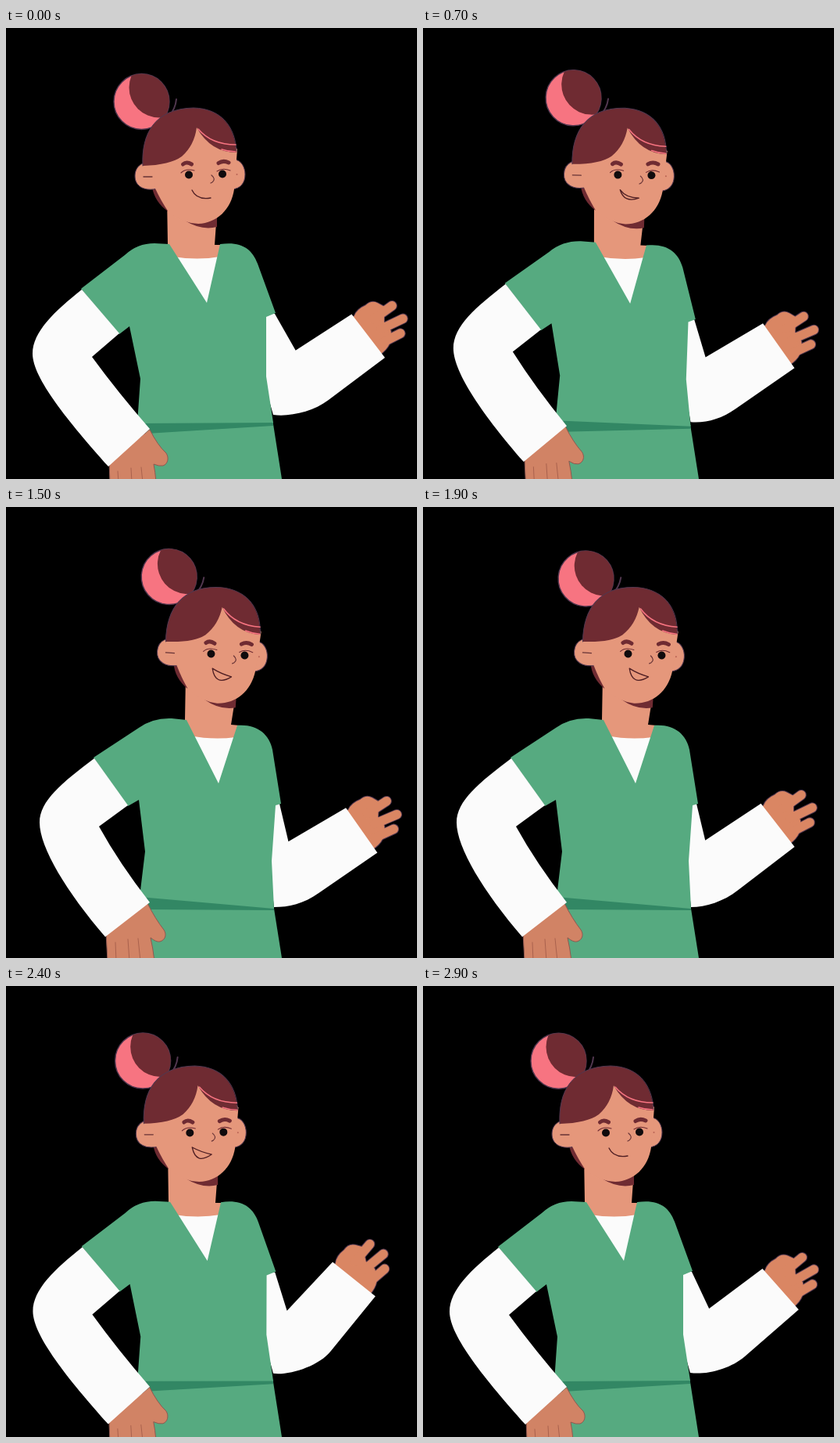
An HTML page with a canvas that plays this animation: 526 px wide and 576 px high, repeating every 3 s.

```html
<!DOCTYPE html>
<html lang="en">
<head>
<meta charset="utf-8">
<title>Waving nurse</title>
<style>
html, body { margin: 0; width: 100%; height: 100%; overflow: hidden; background: #000; }
canvas { display: block; }
</style>
</head>
<body>
<canvas id="stage" width="526" height="576"></canvas>
<script>
const ctx = document.getElementById('stage').getContext('2d');
const LOOP = 3000, STEP = 100;
const C = {
  skin: '#e5977b', hand: '#da8663', hip: '#d18365', hair: '#6f2b32', pink: '#f77481',
  green: '#56aa80', belt: '#328764', white: '#fbfbfb', edge: '#51374f', ink: '#100b0d'
};

const lerp = (a, b, k) => a + (b - a) * k;
const ease = (t, from, to) => {
  const u = Math.min(1, Math.max(0, (t - from) / (to - from)));
  return u * u * (3 - 2 * u);
};

// Periodic cubic through rows of [time, value, ...].
function track(keys, t) {
  const n = keys.length;
  const key = i => {
    const turn = Math.floor(i / n), [time, ...v] = keys[i - turn * n];
    return [time + turn * LOOP, ...v];
  };
  let i = n - 1;
  while (keys[i][0] > t) i--;
  const [a, b, c, d] = [-1, 0, 1, 2].map(j => key(i + j));
  const span = c[0] - b[0], u = (t - b[0]) / span;
  return b.slice(1).map((v, j) => {
    const k = j + 1;
    const m0 = (c[k] - a[k]) / (c[0] - a[0]) * span;
    const m1 = (d[k] - b[k]) / (d[0] - b[0]) * span;
    const w = c[k] - v;
    return v + u * (m0 + u * (3 * w - 2 * m0 - m1 + u * (m0 + m1 - 2 * w)));
  });
}

// Straight interpolation for small accents.
function linear(keys, t) {
  for (let i = 1; i < keys.length; i++) {
    const [t0, a] = keys[i - 1], [t1, b] = keys[i];
    if (t <= t1) return lerp(a, b, (t - t0) / (t1 - t0));
  }
  return keys[keys.length - 1][1];
}

// Blend two path strings of the same structure.
function mix(a, b, k) {
  const end = b.match(/[\d.]+/g);
  let i = 0;
  return a.replace(/[\d.]+/g, n => lerp(+n, +end[i++], k).toFixed(2));
}

function fill(d, color, outline) {
  ctx.fillStyle = color;
  ctx.fill(new Path2D(d));
  if (outline) line(d, outline, 1);
}

function line(d, color, width) {
  ctx.strokeStyle = color;
  ctx.lineWidth = width;
  ctx.lineCap = ctx.lineJoin = 'round';
  ctx.stroke(new Path2D(d));
}

function disc(x, y, rx, ry, color) {
  ctx.beginPath();
  ctx.ellipse(x, y, rx, ry, 0, 0, 7);
  ctx.fillStyle = color;
  ctx.fill();
}

// Elbow pivot x, y and cuff angle.
const WAVE = [
  [0, 374, 462, 52.5], [700, 363, 471, 54.7], [1100, 362, 477, 55.9], [1900, 365, 476, 52],
  [2200, 372.5, 467, 43.3], [2600, 376, 460, 36.7], [2900, 373, 462, 48.5]
];
const BOB = [
  [0, 0], [600, -1.5], [700, -2.5], [900, -4], [1100, 1], [1300, -3], [1500, -1],
  [1900, 1.5], [2200, 1.4], [2600, 2], [2900, 1.7], [3000, 0]
];
const LIDS = [[0, 1], [1000, 1], [1100, .65], [1150, .25], [1200, .4], [1300, 1], [3000, 1]];

const PALM = 'M110,-31 L114,-31 Q122,-36 134,-33 Q144,-34 148,-26 L152,-17 L140,-2 L140,12 Q132,29 110,28 Z';
const FINGERS = 'M131,-13 L160.5,-12 M131,3 L161.5,9.5 M118,17 L147.5,22.5';

function rightArm(t, p) {
  const [px, py, deg] = track(WAVE, t);
  const a = deg * Math.PI / 180, cos = Math.cos(a), sin = Math.sin(a);
  const at = (u, v) => `${(px + u * sin + v * cos).toFixed(2)},${(py - u * cos + v * sin).toFixed(2)} `;

  ctx.save();
  ctx.translate(px, py);
  ctx.rotate(a - Math.PI / 2);
  line(PALM, C.edge, 2);
  line(FINGERS, C.edge, 13.5);
  fill(PALM, C.hand);
  line(FINGERS, C.hand, 11.5);
  ctx.restore();

  fill(mix('M328,362 L344,365 L', 'M340,374 L350,379 L', p) + at(28, -42) + 'L' + at(113, -35) +
    'L' + at(113, 35) + 'L' + at(22, 34) + 'C' + at(-2, 34) +
    mix('362,497 342,494 L328,445 Z', '362,511 343,511 L336,450 Z', p), C.white);
}

function neck(p) {
  fill(mix('M205,286 L257,364 L278,286 Z', 'M227,286 L272,366 L299,286 Z', p), C.white);
  fill(mix(
    'M206,215 L207,276 L214,292 Q245,297 274,292 L277,277 L267,277 L270,235 Z',
    'M230,215 L229,272 L235,292 Q265,298 294,294 L299,279 L288,278 L294,240 Z', p), C.skin);
}

function torso(p) {
  fill(mix('M180,515 L342,506 L353,576 L188,576 Z', 'M180,511 L343,513 L353,576 L188,576 Z', p), C.green);
  fill(mix('M168,503 L342,503 L342,508 L180,518 Z', 'M171,497 L343,511 L343,515 L180,514 Z', p), C.belt);
  fill(mix(
    'M96,333 L152,290 Q168,275 190,275 L209,276 L257,351 L274,276 C301,272 315,282 322,301 ' +
    'L345,364 L333,369 L333,445 L342,504 L168,505 L172,448 L158,381 L145,391 Z',
    'M112,320 L170,282 Q188,269 212,270 L231,272 L272,353 L296,279 C321,277 337,290 341,310 ' +
    'L352,379 L345,381 L340,452 L343,513 L171,498 L178,440 L170,374 L156,382 Z', p), C.green);
}

function leftArm(p) {
  fill(mix(
    'M132,554 L133,580 L192,580 Q191,567 189,557 Q196,560 201,559 C207,557 209,549 205,543 Q194,533 184,513 Z',
    'M128,544 L130,580 L190,580 Q188,563 185,550 Q192,556 197,555 C204,553 206,546 202,540 Q191,526 181,506 Z',
    p), C.hip, '#8f5850');
  line(mix('M143,566 L144,580 M160,562 L161,580 M173,561 L175,580',
    'M140,556 L141,580 M156,552 L158,580 M169,551 L172,580', p), '#a9614d', 1);
  fill(mix(
    'M97,334 C62,362 34,388 34,416 C34,447 80,503 131,560 L184,512 Q143,465 110,420 L145,390 Z',
    'M113,321 C72,352 43,375 43,403 C43,435 78,492 127,549 L184,505 Q145,455 119,408 L156,381 Z',
    p), C.white);
}

function bun(dy) {
  ctx.save();
  ctx.translate(0, dy);
  ctx.beginPath();
  ctx.arc(173.5, 94, 35.5, 0, 7);
  ctx.fillStyle = C.pink;
  ctx.fill();
  ctx.strokeStyle = C.edge;
  ctx.lineWidth = 1.4;
  ctx.stroke();
  ctx.clip();
  disc(196, 76, 38.5, 38.5, C.hair);
  ctx.restore();
}

function face(open, lids) {
  for (const [x, y] of [[234, 187.5], [277, 186.5]]) {
    disc(x, y + (1 - lids) * 2, 5, Math.max(.7, 5 * lids), C.ink);
  }
  line('M224,185 Q230,179 241,182 M270,183 Q277,178 287,182', C.hair, 1.1);
  line('M226.5,174 Q231,170 237.5,174 M272,172.5 Q278,168.5 285,172', C.hair, 5);
  line('M263,188 Q269,193 264,197 L262,198', '#673336', 1.2);
  line('M176,190 L187,190', '#673336', 1.3);
  disc(295.5, 187, 1, 1, '#b96455');
  line(mix('M238,207 Q244,220 262,217 Q244,220 238,207 Z',
    'M237,206 Q248,212 262,215 Q242,229 237,206 Z', open), '#4d1d22', 1.3);
}

function head(t, p) {
  ctx.save();
  ctx.translate(255.5 + 28.5 * p, 186.5 + 1.5 * p);
  ctx.rotate(p * 4 * Math.PI / 180);
  ctx.translate(-255.5, -186.5);

  fill('M187,203 L196,204 L207,222 L207,234 Q190,222 187,203 Z', C.hair);
  fill('M229,246 L270,238 L270,254 Q250,259 229,246 Z', C.hair);
  fill('M194,174 C180,167 165,174 165,189 C165,203 178,209 194,205 Z', C.skin, C.edge);
  fill('M292,168 C301,168 306,178 306,187 C306,198 300,205 290,206 Z', C.skin, C.edge);
  fill('M188,160 L191,205 Q199,222 208,235 Q225,249 246,250 C270,249 288,232 292,206 ' +
    'L296,155 L270,118 L220,118 Z', C.skin);

  bun(linear(BOB, t));
  line('M208,114 Q217,103 218,91', C.edge, 2);
  fill('M175,176 C173,135 190,103 240,102 C275,103 293,125 295,159 Q262,159 244,127 ' +
    'Q241,150 225,164 Q210,175 175,176 Z', C.hair);
  line('M175,176 C173,135 190,103 240,102 C275,103 293,125 295,157', C.edge, 1);
  line('M246,129 Q263,149 294,149', C.pink, 1.6);
  line('M276,155 Q285,158 294,158', C.pink, 1.6);

  const open = ease(t, 550, 900) * (1 - ease(t, 2600, 2880));
  face(open, linear(LIDS, t));
  ctx.restore();
}

function draw(now) {
  const t = Math.floor(now % LOOP / STEP) * STEP;
  const p = ease(t, 460, 915) - ease(t, 2000, 2460);
  ctx.fillStyle = '#000';
  ctx.fillRect(0, 0, 526, 576);
  rightArm(t, p);
  neck(p);
  torso(p);
  leftArm(p);
  head(t, p);
}

const start = performance.now();
function tick() {
  draw(performance.now() - start);
  requestAnimationFrame(tick);
}
tick();
</script>
</body>
</html>
```
